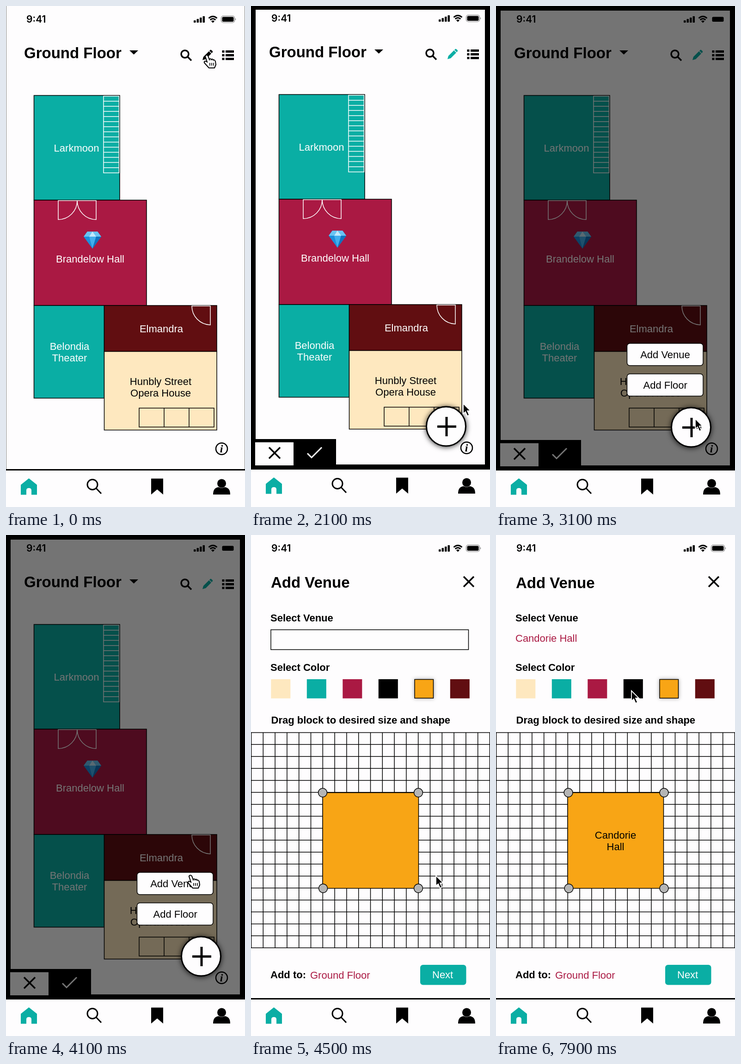
Animation of 517 by 1084 pixels, one loop 8 s. Source, as an HTML page:

```html
<!DOCTYPE html>
<html lang="en">
<head>
<meta charset="utf-8">
<title>Floor plan editor</title>
<style>
  html, body { margin: 0; height: 100%; overflow: hidden; background: #fefdfe; }
  svg { display: block; width: 100vw; height: 100vh; font: 22px "Liberation Sans", Arial, sans-serif; }
  .b { font-weight: 700; }
  .h { font-weight: 700; font-size: 33px; }
  .m { text-anchor: middle; }
  .line { fill: none; stroke: #000; stroke-width: 1.5; }
  .white { fill: none; stroke: #fff; stroke-width: 1.5; }
  .shadow { filter: drop-shadow(0 1px 6px #000c); }
  .glow { filter: drop-shadow(0 0 4px #0005); }
</style>
</head>
<body>
<svg id="stage" viewBox="0 0 517 1084" preserveAspectRatio="none"></svg>
<script>
const TEAL = '#0aaea4', WINE = '#aa1943', BROWN = '#610e11', CREAM = '#fee8bf',
      ORANGE = '#f8a515', PAPER = '#fefdfe';

const rect = (x, y, w, h, fill, more = '') =>
  `<rect x="${x}" y="${y}" width="${w}" height="${h}" fill="${fill}" ${more}/>`;
const boxed = (x, y, w, h, fill, more = '') =>
  rect(x, y, w, h, fill, 'stroke="#000" stroke-width="1.5" ' + more);
const text = (x, y, str, fill = '#000', cls = '') =>
  `<text x="${x}" y="${y}" fill="${fill}" class="${cls}">${str}</text>`;
const label = (x, y, fill, ...lines) =>
  lines.map((s, i) => text(x, y + i * 25, s, fill, 'm')).join('');
const path = (d, more = 'fill="#000"') => `<path d="${d}" ${more}/>`;
const pen = (w, color = '#000') => `fill="none" stroke="${color}" stroke-width="${w}"`;
const group = (id, ...parts) => `<g id="${id}">${parts.join('')}</g>`;
const series = (n, f) => Array.from({ length: n }, (_, i) => f(i)).join('');

const pencil = color =>
  path('M425 117L427 110L439 98L444 103L432 115ZM440 97L442 95Q443 94 445 96L447 98Q448 99 446 101L445 102Z',
       `fill="${color}"`);

const gem = path('M176 488H198L206 499L187 525L168 499Z', 'fill="#1c8fdc"')
  + path('M176 488H198L206 499H168Z', 'fill="#69c3f2"')
  + path('M180 499L187 488L195 499Z', 'fill="#c2e9fc"')
  + path('M180 499H195L187 525Z', 'fill="#42aeed"')
  + path('M195 499H206L187 525Z', 'fill="#1173bf"');

const plan = [
  boxed(60.5, 193.5, 185.5, 226.5, TEAL),
  path('M211 195H244.5V361H211Z' + series(14, i => `M211 ${206 + i * 11.05}h33.5`), 'class="white"'),
  label(152.5, 315, '#fff', 'Larkmoon'),
  boxed(60.5, 420, 243.5, 228, WINE),
  path('M113 421H195V462A41 41 0 0 1 154 421A41 41 0 0 1 113 462Z', 'class="white"'),
  gem,
  label(182, 555, '#fff', 'Brandelow Hall'),
  boxed(60.5, 648, 152, 200.5, TEAL),
  label(137.5, 744, '#fff', 'Belondia', 'Theater'),
  boxed(212.5, 648, 243.5, 99.5, BROWN),
  path('M402 649H442V690A41 41 0 0 1 402 649Z', 'class="white"'),
  label(336, 706, '#fff', 'Elmandra'),
  boxed(212.5, 747.5, 243.5, 170, CREAM),
  label(334.5, 820, '#000', 'Hunbly Street', 'Opera House'),
  path('M288 870H450V911H288ZM342 870V911M396 870V911', 'class="line"')
].join('');

const home = group('home',
  path('M.5 0V1002M516.500 0V1002', pen(1, '#888')),
  text(39, 113, 'Ground Floor', '#000', 'h'),
  path('M267 96H286L276.500 105Z'),
  path('M393 110L401 118M395 104A8 8 0 1 1 379 104A8 8 0 1 1 395 104Z', pen(3.5)),
  group('blackPencil', pencil('#000')), group('tealPencil', pencil(TEAL)),
  series(3, i => rect(467.5, 96 + i * 8, 5, 5, '#000') + rect(475, 96 + i * 8, 18, 5, '#000')),
  plan,
  `<circle cx="466.500" cy="958" r="12.500" ${pen(2.5)}/>`,
  '<text x="466" y="966" class="m" font-family="Liberation Serif, serif" font-size="24" font-weight="700" font-style="italic">i</text>',
  group('editFrame',
    path('M-5 -5H522V1010H-5ZM10 10V994H506V10Z', 'fill-rule="evenodd"'),
    rect(8, 939, 176, 66, '#000'), rect(9, 946, 83, 50, PAPER),
    path('M39 957L63 981M63 957L39 981', pen(3.5)),
    path('M122 970L131 979L153 957', pen(3, '#fff'))));

const plus = group('plus',
  '<circle cx="422" cy="911.500" r="42.500" fill="#fefdfe" stroke="#000" stroke-width="3" class="shadow"/>',
  path('M403 912H444M423 891V933', pen(5)));

const addVenue = group('addVenue',
  boxed(283.5, 730, 164.5, 48, PAPER, 'rx="6"'), label(366, 762, '#000', 'Add Venue'));

const colors = [CREAM, TEAL, WINE, '#000', ORANGE, BROWN];
const swatches = colors.map((c, i) => i === 4
  ? boxed(354, 312.5, 40.5, 40.5, c, 'class="glow"')
  : rect(43.3 + i * 77.5, 312, 42, 41.5, c)).join('');

const gridLines = series(21, i => `M${.5 + i * 25.8} 427.5V893`)
  + series(19, i => `M0 ${427.5 + i * 25.87}H517`);
const handles = [[155, 557.5], [362, 557.5], [156, 764.5], [362, 764.5]]
  .map(([x, y]) => `<circle cx="${x}" cy="${y}" r="9.500" fill="#b5b5b5" stroke="#000" stroke-width="1.500"/>`).join('');

const names = ['Cavillenta Theater of Performing Arts', 'Cadfiln Hall', 'Candorie Hall'];
const form = group('form',
  rect(0, 57, 517, 96, PAPER),
  group('title', text(43, 113.5, 'Add Venue', '#000', 'h')),
  path('M460 90L482 112M482 90L460 112', pen(3.5)),
  text(42, 187, 'Select Venue', '#000', 'b'),
  group('input', boxed(43, 205, 427.5, 43, 'none')),
  text(42, 294, 'Select Color', '#000', 'b'),
  swatches,
  text(43.5, 407.5, 'Drag block to desired size and shape', '#000', 'b'),
  path(gridLines, 'class="line"'),
  boxed(155, 557.5, 207.5, 207, ORANGE),
  group('handles', handles),
  text(42, 959, 'Add to:', '#000', 'b'),
  text(128, 960, 'Ground Floor', WINE),
  group('dropdown',
    boxed(43, 205, 427.5, 41.5, PAPER), text(58.5, 233.5, 'Ca'),
    names.map((s, i) => boxed(43, 246.5 + i * 41.6, 427.5, 42, '#efeef1') + text(58.5, 275 + i * 41.5, s)).join('')),
  group('chosen', text(42, 231, 'Candorie Hall', WINE), label(258.5, 656.5, '#000', 'Candorie', 'Hall')));

const morph = group('morph',
  '<rect id="pill" rx="6" stroke="#000" stroke-width="1.500"/>',
  '<text id="floorText">Add Floor</text>',
  '<text id="nextText" fill="#fff">Next</text>');

const chrome = group('chrome',
  '<text x="44" y="36" font-family="Inter, sans-serif" font-size="21" font-weight="600">9:41</text>',
  series(4, i => rect(406 + i * 6.5, 31 - i * 3, 4.5, 5 + i * 3, '#000', 'rx="1"')),
  path('M438.500 26.500Q447.500 18.500 456.500 26.500M441.700 30Q447.500 25 453.300 30', pen(3)),
  path('M447.500 36.500L443.800 32.800Q447.500 29.800 451.200 32.800Z'),
  rect(465.5, 21.5, 29, 14.5, 'none', 'rx="4.500" stroke="#777" stroke-width="1.200"'),
  rect(467.5, 23.5, 25, 10.5, '#000', 'rx="2.500"'),
  path('M496 26.500Q498.500 28.700 496 31Z', 'fill="#777"'),
  rect(0, 1004, 517, 90, PAPER), rect(0, 1002, 517, 3, '#000'),
  path('M32 1036L49.500 1022L67 1036V1057.500H55V1048Q55 1043 49.500 1043Q44 1043 44 1048V1057.500H32Z', `fill="${TEAL}"`),
  path('M194.500 1043L206 1055M198 1035.500A11 11 0 1 1 176 1035.500A11 11 0 1 1 198 1035.500Z', pen(3)),
  path('M314 1022.500H340V1057L327 1046L314 1057Z'),
  '<circle cx="466.500" cy="1033" r="9.500"/>',
  path('M448 1057Q448 1042 460 1041Q466 1045 473 1041Q485 1042 485 1057Z'));

const cursors = group('cursor',
  path('M0 0V22L5 18L9 27L13 25L9 16H16Z', 'id="arrow" stroke="#fff" stroke-width="1.800"'),
  group('hand',
    path('M-4 2C-4-1 0-2 2 1L5 9C6 6 9 7 9 9C11 7 13 8 13 10C15 9 17 10 18 13L19 20L16 27H4L-5 17C-8 14-5 11-2 13L0 14Z',
         'fill="#fff" stroke="#000" stroke-width="2"'),
    path('M6 16V22M10 16V22M14 16V22', pen(1.6))));

const stage = document.getElementById('stage');
stage.innerHTML = home + '<rect id="dim" width="517" height="1006"/>' + plus + addVenue + form + morph + chrome + cursors;

const $ = id => document.getElementById(id);
const fade = (id, v) => $(id).setAttribute('opacity', v);
const move = (id, x, y) => $(id).setAttribute('transform', `translate(${x} ${y})`);
const place = (id, attrs) => { for (const k in attrs) $(id).setAttribute(k, attrs[k]); };
const mix = (a, b, p) => a + (b - a) * p;
const clamp = x => Math.min(1, Math.max(0, x));
const ramp = (t, start) => 1 - (1 - clamp((t - start) / 300)) ** 2;
const smooth = x => x * x * (3 - 2 * x);

// Pointer stops: time, x, y
const stops = [[0, 435, 107], [1100, 435, 107], [1800, 459, 860], [2100, 459, 860], [2600, 431, 893],
  [3200, 431, 893], [3900, 400, 737], [4700, 400, 737], [5800, 316, 231], [6500, 316, 231],
  [7100, 300, 345], [7400, 300, 345], [7800, 293, 337], [8000, 293, 337]];
const overTarget = [[0, 1100], [2400, 2900], [3600, 4200], [5700, 7400]];

function pointer(t) {
  const i = stops.findIndex(s => s[0] > t), a = stops[i - 1], b = stops[i];
  const p = smooth((t - a[0]) / (b[0] - a[0]));
  move('cursor', mix(a[1], b[1], p), mix(a[2], b[2], p));
  const isHand = overTarget.some(([from, to]) => t >= from && t < to);
  fade('hand', +isHand);
  fade('arrow', +!isHand);
}

function draw(t) {
  const edit = ramp(t, 800), menu = ramp(t, 2800), venue = ramp(t, 4200),
        list = ramp(t, 5900), done = ramp(t, 7300);
  const lift = -2 * edit * (1 - menu), leaving = 1 - venue;
  for (const id of ['home', 'plus', 'chrome']) move(id, 0, lift);
  fade('blackPencil', 1 - edit);
  fade('tealPencil', edit);
  fade('editFrame', edit);

  // The plan, dimmer and menu dissolve separately over the paper
  fade('home', leaving);
  fade('dim', .54 * menu * leaving);
  fade('plus', edit * leaving);
  fade('addVenue', menu * leaving);

  fade('form', venue);
  fade('dropdown', list * (1 - done));
  fade('input', 1 - done);
  fade('chosen', done);
  move('title', 0, done);
  move('handles', 1.5 * done, 0);

  const x = mix(283.5, 366, venue), y = mix(796, 930, venue);
  const width = mix(164.5, 99.5, venue), height = mix(48, 43.5, venue);
  const fill = `rgb(${mix(254, 10, venue)},${mix(253, 174, venue)},${mix(254, 164, venue)})`;
  place('pill', { x, y, width, height, fill, 'stroke-opacity': leaving });
  place('floorText', { x: x + 35, y: y + 32, opacity: leaving });
  place('nextText', { x: x + 26, y: y + 29, opacity: venue });
  fade('morph', menu);
  pointer(t);
}

function tick() {
  draw(Math.floor(performance.now() % 8000 / 100) * 100);
  requestAnimationFrame(tick);
}
tick();
</script>
</body>
</html>
```
